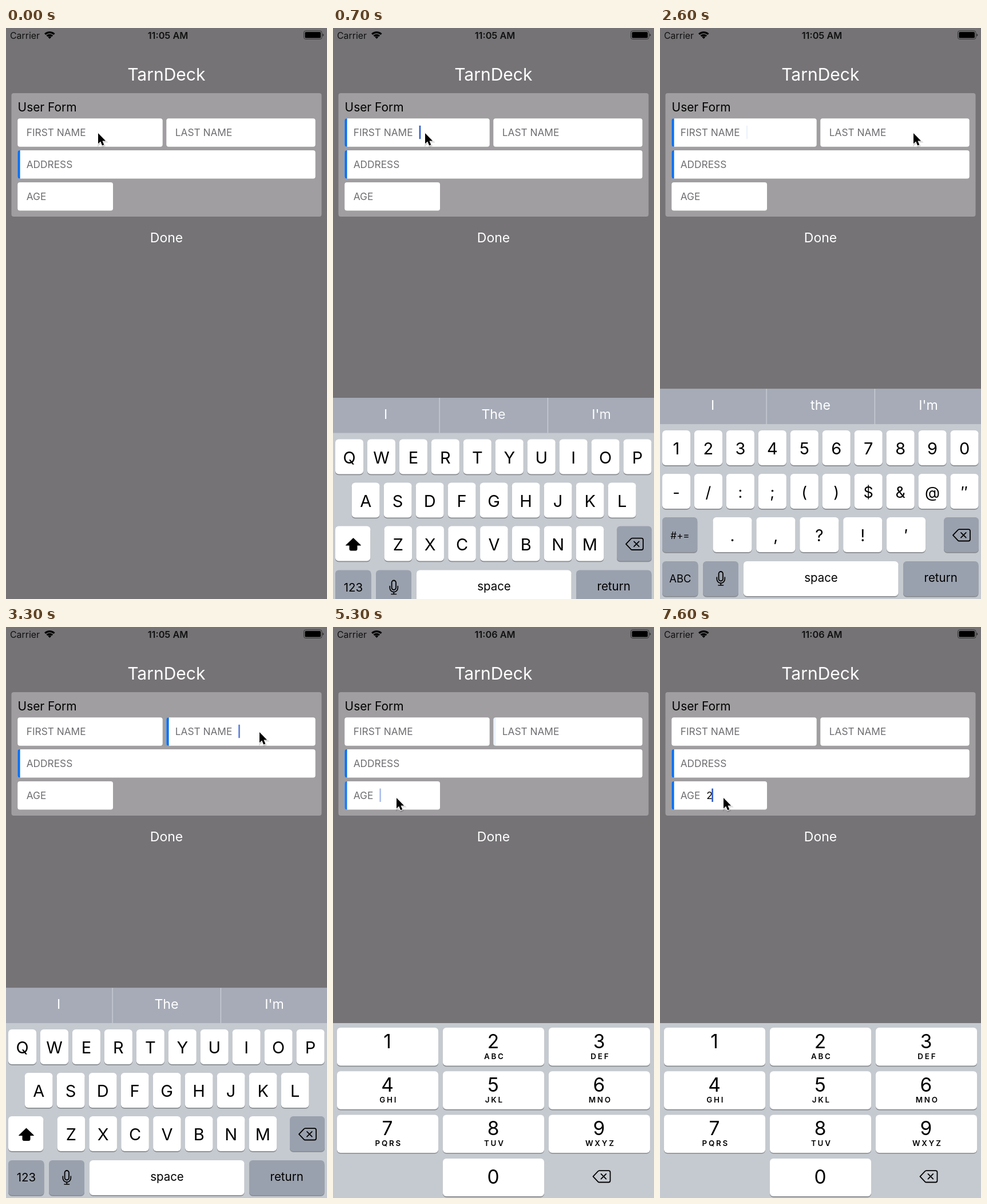
Recreate the animation shown at these times as an HTML page. Size 561 px wide and 999 px high, loop 8000 ms.

```html
<!DOCTYPE html>
<html lang="en">
<head>
<meta charset="utf-8">
<title>User form</title>
<style>
  html, body { margin: 0; width: 100%; height: 100%; overflow: hidden; background: #757376; }
  svg { display: block; width: 100%; height: 100%; }
  text { font-family: Inter, "Open Sans", sans-serif; white-space: pre; }
  .mid { text-anchor: middle; }
</style>
</head>
<body>
<svg id="stage" viewBox="0 0 561 999"></svg>
<script>
const LOOP = 8000, STEP = 100;
const BLUE = '#0b6ff0', KEY_DARK = '#9aa1ae', KEY_SHADE = '#888c91', BOARD = '#c5cad0';
const stage = document.getElementById('stage');

function el(parent, tag, attrs, content) {
  const node = document.createElementNS('http://www.w3.org/2000/svg', tag);
  for (const k in attrs) node.setAttribute(k, attrs[k]);
  if (content !== undefined) node.textContent = content;
  parent.appendChild(node);
  return node;
}
const group = (parent, attrs = {}) => el(parent, 'g', attrs);
const box = (parent, x, y, width, height, fill, rx = 0) =>
  el(parent, 'rect', { x, y, width, height, fill, rx });
const text = (parent, x, y, size, str, fill = '#000', more = {}) =>
  el(parent, 'text', { x, y, 'font-size': size, fill, ...more }, str);
const mid = (parent, x, y, size, str, fill, more) =>
  text(parent, x, y, size, str, fill, { class: 'mid', ...more });
const line = (parent, d, width = 2) =>
  el(parent, 'path', { d, fill: 'none', stroke: '#000', 'stroke-width': width,
    'stroke-linecap': 'round', 'stroke-linejoin': 'round' });

// Status bar
box(stage, 0, 0, 561, 999, '#757376');
text(stage, 7, 18.7, 15.9, 'Carrier', '#111');
const wifi = group(stage, { transform: 'translate(76.3 19)' });
for (const [r, w] of [[11.6, 3.2], [6.9, 3]]) {
  const s = r * 0.7;
  el(wifi, 'path', { d: `M${-s} ${-s}A${r} ${r} 0 0 1 ${s} ${-s}`, fill: 'none',
    stroke: '#000', 'stroke-width': w });
}
el(wifi, 'path', { d: 'M0 0L-3 -3.2A4.3 4.3 0 0 1 3 -3.2Z' });
const clock = mid(stage, 283, 18.8, 16.3, '', '#111', { 'font-weight': 600 });
el(stage, 'rect', { x: 520.5, y: 5, width: 31.5, height: 14.5, rx: 3.2,
  fill: 'none', stroke: '#333', 'stroke-width': 1 });
box(stage, 522.5, 7, 27.5, 10.5, '#000', 1.6);
el(stage, 'path', { d: 'M553.3 9.8q2 .8 2 2.5t-2 2.5z', fill: '#333' });

// Form
mid(stage, 280.3, 92, 30, 'TarnDeck', '#fff');
box(stage, 9.5, 114, 542, 216, '#a09ea0', 4);
text(stage, 20.6, 146.4, 20.9, 'User Form');
mid(stage, 280.5, 374.6, 23, 'Done', '#fff');

function field(x, y, w, label) {
  box(stage, x, y, w, 49.5, '#fff', 4);
  const bar = el(stage, 'path', { fill: BLUE,
    d: `M${x + 4.3} ${y}v49.5h-.8a3.5 4 0 0 1 -3.5 -4v-41.5a3.5 4 0 0 1 3.5 -4z` });
  text(stage, x + 15.4, y + 31.2, 17.3, label, '#6e6e72');
  return bar;
}
const firstBar = field(20.3, 158.2, 253.4, 'FIRST NAME');
const lastBar = field(280.3, 158.2, 260.4, 'LAST NAME');
field(20.3, 214, 520.4, 'ADDRESS');
const ageBar = field(20.3, 270, 166.7, 'AGE');
const digit = text(stage, 81.3, 301.2, 17.6, '2');
const caret = box(stage, 0, 0, 2.7, 23.5, '#3460d2', 0.6);

// Keyboards
function key(parent, x, y, w, h, fill = '#fff') {
  box(parent, x, y + 1.7, w, h, KEY_SHADE, 6);
  box(parent, x, y, w, h, fill, 6);
}
function row(parent, str, x, y, pitch, w, size) {
  [...str].forEach((ch, i) => {
    const kx = x + pitch * i;
    key(parent, kx, y, w, 61);
    mid(parent, kx + w / 2, y + 42, size, ch);
  });
}
function eraser(parent, x, y) {
  const g = group(parent, { transform: `translate(${x} ${y})` });
  line(g, 'M-15 0L-6.5 -9Q-5.5 -10.2 -4 -10.2H12Q15 -10.2 15 -7.2V7.2Q15 10.2 12 10.2H-4Q-5.5 10.2 -6.5 9Z', 1.8);
  line(g, 'M-1 -4.4L7.8 4.4M7.8 -4.4L-1 4.4', 1.8);
}

const board = group(stage);
box(board, 0, 631.5, 561, 368, BOARD);
box(board, 0, 631.5, 561, 61.5, '#a6abb7');
for (const x of [185.5, 374.8]) box(board, x, 631.5, 1.2, 61.5, '#cdd1d8');

const hints = [['I', 92], ['The', 280.5], ["I'm", 469]].map(([str, x]) => {
  const t = mid(board, x, 668, 23.2, undefined, '#fff');
  return [...str].map(ch => el(t, 'tspan', {}, ch));
});

key(board, 496, 856, 61, 61, KEY_DARK);
eraser(board, 527, 887.3);
key(board, 4, 933, 62.5, 61, KEY_DARK);
key(board, 75, 933, 62, 61, KEY_DARK);
const mic = group(board, { transform: 'translate(106.3 963)' });
el(mic, 'rect', { x: -3.7, y: -12, width: 7.4, height: 16.5, rx: 3.7,
  fill: 'none', stroke: '#000', 'stroke-width': 1.8 });
line(mic, 'M-7 -2V1A7 7.2 0 0 0 7 1V-2M0 8.3V12M-4.2 12H4.2', 1.7);
key(board, 146, 933, 270.5, 61);
mid(board, 281.5, 968.6, 20.4, 'space');
key(board, 425, 933, 131.5, 61, KEY_DARK);
mid(board, 490.7, 968.6, 20.5, 'return');

const letters = group(board);
row(letters, 'QWERTYUIOP', 4, 704, 55.95, 49, 29);
row(letters, 'ASDFGHJKL', 32.8, 780, 56, 48.7, 29);
row(letters, 'ZXCVBNM', 89.6, 856, 55.85, 48.5, 29);
key(letters, 4, 856, 61.3, 61);
el(letters, 'path', { d: 'M35.5 877L48.5 889.5H42V896.5Q42 898.5 40 898.5H31Q29 898.5 29 896.5V889.5H22.5Z',
  stroke: '#000', 'stroke-linejoin': 'round' });
mid(letters, 35.5, 970.4, 20.5, '123');

const symbols = group(board);
row(symbols, '1234567890', 4, 704, 55.95, 49, 29);
row(symbols, '-/:;()$&@″', 4, 780, 55.95, 49, 27);
row(symbols, '.,?!′', 92.5, 856, 75.9, 68, 28);
key(symbols, 4, 856, 61.3, 61, KEY_DARK);
mid(symbols, 35, 894, 17, '#+=');
mid(symbols, 35.3, 970, 18.4, 'ABC');

const pad = group(stage);
box(pad, 0, 693, 561, 306, BOARD);
['', 'ABC', 'DEF', 'GHI', 'JKL', 'MNO', 'PQRS', 'TUV', 'WXYZ'].forEach((str, i) => {
  const x = 7 + 185 * (i % 3), y = 701 + 76.2 * Math.floor(i / 3);
  key(pad, x, y, 177, 66.5);
  mid(pad, x + 88, y + 35.5, 33.5, i + 1);
  mid(pad, x + 90.3, y + 55, 13.4, str, '#000', { 'font-weight': 600, 'letter-spacing': 2.8 });
});
key(pad, 192, 930, 177, 66);
mid(pad, 280, 973.5, 33.5, '0');
eraser(pad, 469.5, 961.3);

// Mouse pointer
const pointer = group(stage);
const ARROW = 'M0 0V17.2L3.9 13.5L6.6 20L9.6 18.7L6.9 12.4H12.2Z';
el(pointer, 'path', { d: ARROW, transform: 'translate(.6 1.6) scale(1.08)',
  fill: '#0003', stroke: '#0002', 'stroke-width': 3 });
el(pointer, 'path', { d: ARROW, transform: 'scale(1.08)', fill: '#000', stroke: '#fff',
  'stroke-width': 2, 'paint-order': 'stroke', 'stroke-linejoin': 'round' });

// Motion
const ramp = (t, start, span) => Math.min(1, Math.max(0, (t - start) / span));
const mix = (a, b, p) => a + (b - a) * p;
const show = (node, on) => node.setAttribute('display', on ? 'inline' : 'none');
const fade = (node, a) => node.setAttribute('opacity', a);

// Caret fades: start, opacity from, opacity to
const OUT = [0.8, 0], IN = [0.08, 1], ON = [1, 1];
const BLINKS = [
  [400, ON], [1100, OUT], [1600, IN], [2100, OUT], [2600, IN], [2800, ON],
  [3300, OUT], [3800, IN], [4300, OUT], [4500, IN], [5200, OUT], [5700, IN],
  [6200, OUT], [6700, IN], [7200, OUT], [7500, ON]
];
function caretAlpha(t) {
  const blink = BLINKS.filter(b => b[0] <= t).pop();
  return blink ? mix(...blink[1], ramp(t, blink[0], 200)) : 0;
}

function pointerAt(t) {
  const p = ramp(t, 1540, 760), across = p * p * (3 - 2 * p);
  const down = 1 - (1 - ramp(t, 3300, 1400)) ** 2;
  return [mix(mix(161, 443, across), 111, down), mix(184, 299, down)];
}

function draw(t) {
  const toLast = ramp(t, 2750, 200), toAge = ramp(t, 5190, 120);
  fade(firstBar, ramp(t, 350, 180) * (1 - toLast));
  fade(lastBar, toLast * (1 - toAge));
  fade(ageBar, toAge);

  const onAge = t >= 5200, typed = t >= 7500;
  const x = typed ? 90.3 : onAge ? 81.3 : t >= 2800 ? 406.2 : 150.6;
  caret.setAttribute('x', x);
  caret.setAttribute('y', onAge ? 282.5 : 170.7);
  fade(caret, caretAlpha(t));
  show(digit, typed);
  clock.textContent = t < 4100 ? '11:05 AM' : '11:06 AM';

  const numeric = (t >= 1100 && t < 2800) || t >= 4100;
  const drop = t < 900 ? 368 * Math.exp((380 - t) / 101) : 0;
  board.setAttribute('transform', `translate(0 ${drop.toFixed(1)})`);
  show(board, t >= 400 && !onAge);
  show(pad, onAge);
  show(letters, !numeric);
  show(symbols, numeric);
  hints[1][0].textContent = numeric ? 't' : 'T';
  for (const hint of hints)
    hint.forEach((ch, i) => ch.setAttribute('fill-opacity', ramp(t, 300 + 85 * i, 250)));

  pointer.setAttribute('transform', `translate(${pointerAt(t).join(' ')})`);
}

const start = performance.now();
function tick() {
  const t = (performance.now() - start) % LOOP;
  draw(Math.floor(t / STEP) * STEP);
  requestAnimationFrame(tick);
}
tick();
</script>
</body>
</html>
```
